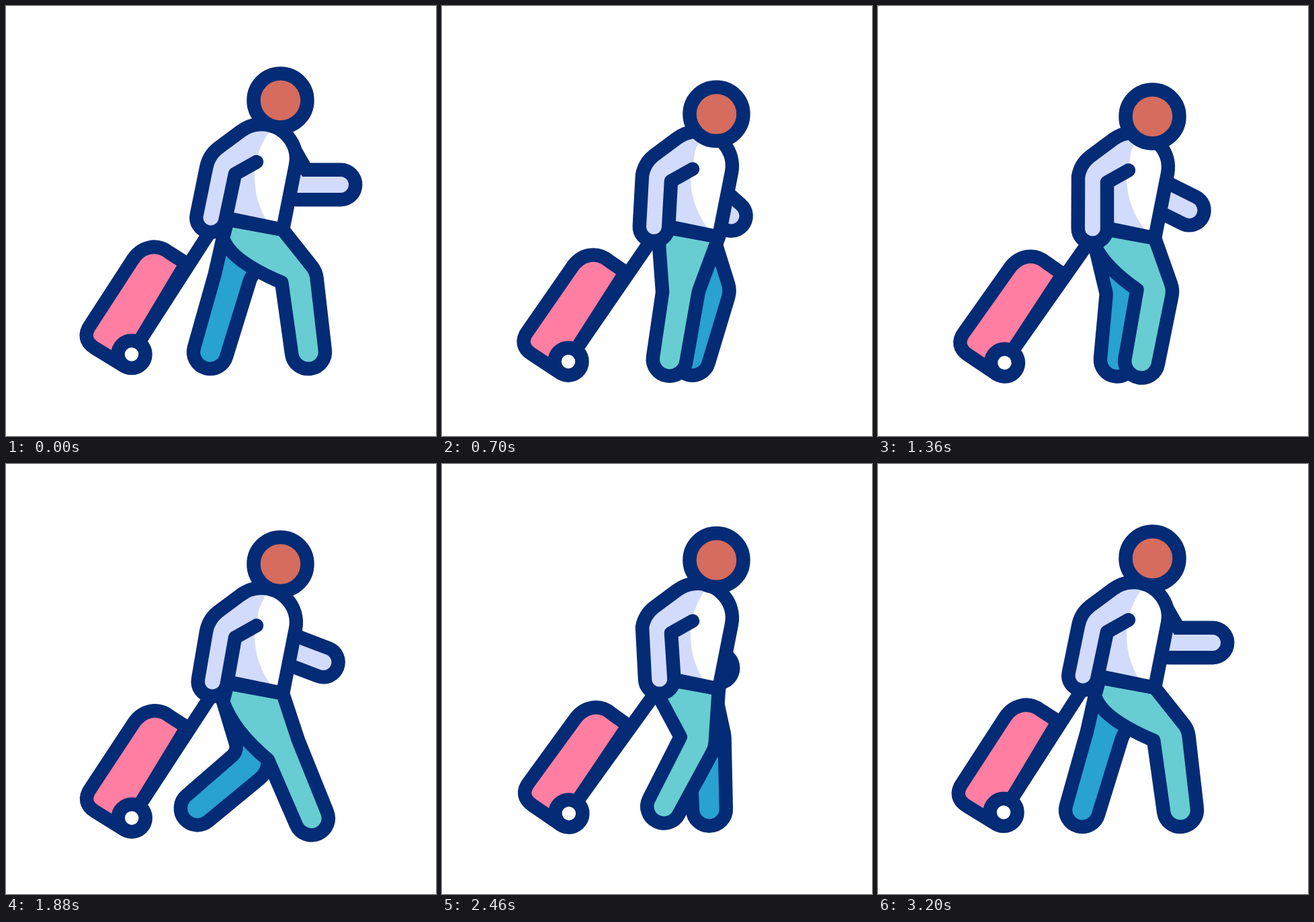
Recreate the animation shown at these times as an HTML page with a canvas. Size 640x640 px, loop 3600 ms.

```html
<!DOCTYPE html>
<html lang="en">
<head>
<meta charset="utf-8">
<title>Traveller with suitcase</title>
<style>
html, body { margin: 0; width: 100%; height: 100%; overflow: hidden; background: #fff; }
canvas { display: block; width: 100vw; height: 100vh; }
</style>
</head>
<body>
<canvas id="stage" width="640" height="640"></canvas>
<script>
const ctx = document.getElementById('stage').getContext('2d');
const NAVY = '#042b75', TEAL = '#67cdd2', BLUE = '#28a2cf', LILAC = '#d2dbfc',
      PINK = '#ff7ea1', SKIN = '#d56c5d', LINE = 20.5, LOOP = 3600;
const { sin, cos, abs, max, min, hypot, atan2, PI } = Math;

// Walking pace: time in ms against strides taken, two in all.
const pace = [[0, 0], [700, 0.375], [1360, 0.875], [1880, 1.125], [2460, 1.75], [3200, 2]];

// One stride of a leg in even steps: knee x, y and ankle x, y. Both legs share it.
const gait = [
  [435, 408, 450, 515], [413, 422, 455, 519], [393, 413, 398, 512], [353, 419, 339, 515],
  [335, 405, 304, 515], [355, 442, 273, 504], [377, 416, 330, 508], [410, 414, 392, 516]
];

function hermite(a, b, da, db, u) {
  const v = 1 - u;
  return v * v * (1 + 2 * u) * a + u * u * (3 - 2 * u) * b + u * v * (v * da - u * db);
}

// Smooth and always forward.
function strides(t) {
  const last = pace.length - 1;
  if (t >= pace[last][0]) return pace[last][1];
  const speed = k => (pace[k + 1][1] - pace[k][1]) / (pace[k + 1][0] - pace[k][0]);
  const tangent = k => k % last ? 2 / (1 / speed(k - 1) + 1 / speed(k)) : 0;
  const k = pace.findIndex(p => t < p[0]) - 1;
  const [t0, a] = pace[k], [t1, b] = pace[k + 1], h = t1 - t0;
  return hermite(a, b, h * tangent(k), h * tangent(k + 1), (t - t0) / h);
}

function step(phase) {
  const n = gait.length, x = (phase + 1) % 1 * n, i = Math.floor(x);
  const [p, a, b, q] = [-1, 0, 1, 2].map(d => gait[(i + d + n) % n]);
  return a.map((v, j) => hermite(v, b[j], (b[j] - p[j]) / 2, (q[j] - v) / 2, x - i));
}

// Far arm: 0 is fully forward, 1 fully back.
const armSwing = p => p < 0.75 ? 1 - (1 - p / 0.75) ** 2 : abs(cos(2 * PI * (p - 0.75))) ** 2.6;
// Two dips per stride, the second one late.
const dip = p => abs(sin(2 * PI * (p - 0.23 * sin(PI * p * p) ** 2))) ** 1.2;

function paint(path, fill, width = LINE) {
  if (fill) { ctx.fillStyle = fill; ctx.fill(path); }
  if (width) { ctx.lineWidth = width; ctx.strokeStyle = NAVY; ctx.stroke(path); }
}
function disc(x, y, r, fill) {
  const p = new Path2D();
  p.arc(x, y, r, 0, 7);
  paint(p, fill);
}
// Unit vector from a to b and its forward-facing normal.
function axes(ax, ay, bx, by) {
  const d = hypot(bx - ax, by - ay), dx = (bx - ax) / d, dy = (by - ay) / d;
  return { dx, dy, nx: dy, ny: -dx, turn: atan2(-dx, dy) };
}

function leg([kx, ky, fx, fy], fill, isNear) {
  const r = 25, { dx, dy, nx, ny, turn } = axes(kx, ky, fx, fy);
  const backX = kx - r * nx, backY = ky - r * ny, hipX = 323, hipY = 345;
  const p = new Path2D();
  p.moveTo(isNear ? 412 : 408, isNear ? 333 : 345);
  p.arcTo(kx + 28 * nx - 9 * dx, ky + 28 * ny - 9 * dy, fx + r * nx, fy + r * ny, 35);
  p.arc(fx, fy, r, turn, turn + PI);
  if (isNear) {
    const sag = max(0, backX - 365) * 0.75;
    p.lineTo(backX, backY);
    p.quadraticCurveTo((backX + hipX) / 2 - sag, (backY + hipY) / 2, hipX, hipY);
    p.lineTo(330, 318);
  } else {
    p.arcTo(backX, backY, hipX, hipY, 18);
    p.lineTo(hipX, hipY);
  }
  p.closePath();
  paint(p, fill);
}

function farArm(s) {
  const x = 434 - 64 * s, y = 266 - 5 * s, bend = PI / 4 * sin(s * PI / 2), len = 64 - 6 * s;
  const p = new Path2D();
  p.moveTo(396, 200);
  p.lineTo(x, y);
  p.lineTo(x + len * cos(bend), y + len * sin(bend));
  paint(p, null, 65);
  ctx.lineWidth = 24;
  ctx.strokeStyle = LILAC;
  ctx.stroke(p);
}

const caseBody = new Path2D('M268 383 L243 367 C224 352 200 358 187 380 L126 474 C115 489 119 501 132 509 L176 536 L201 495 Z');
const handle = new Path2D('M187 517 L301 340');
function suitcase(hand) {
  const sway = hand - 305;
  ctx.save();
  ctx.translate(187 + sway * 0.1, 518);
  ctx.rotate(sway * 0.165 * PI / 180);
  ctx.translate(-187, -518);
  paint(caseBody, PINK);
  paint(handle);
  disc(187, 518.5, 20.5, '#fff');
  ctx.restore();
}

const trunkLine = 'M330 316 L412 333 L431 237 C437 205 412 176 380 176';
const trunk = new Path2D(trunkLine), shirt = new Path2D(trunkLine + 'L341 250 Z');
const light = new Path2D('M405 172 C382 195 370 225 370 253 C370 285 380 312 400 336 L400 360 L450 360 L450 150 L405 150 Z');
function torso(dy) {
  paint(shirt, LILAC, 0);
  ctx.save();
  ctx.clip(shirt);
  ctx.translate(0, -dy);   // the lit edge stays put while the body bobs
  paint(light, '#fff', 0);
  ctx.restore();
  paint(trunk);
}

function nearArm(hand) {
  const y = 315 + min(3.5, (hand - 305) * 0.25), r = 21.7;
  const { nx, ny, turn } = axes(320, 245, hand, y);
  const p = new Path2D('M380 176 C365 176 356 182 350 186 L315 212 C305 220 300 230 298 241');
  p.lineTo(hand - r * nx, y - r * ny);
  p.arc(hand, y, r, turn + PI, turn, true);
  p.lineTo(341, 250);
  p.lineTo(373, 232);
  paint(p, LILAC);
}

function draw(t) {
  const p = strides(t) % 1;
  const hop = t < 560 ? sin(PI * t / 560) ** 2 : 0;   // springy first step
  const dy = 12.7 * dip(p) - 20 * hop;
  const nod = 11.5 * dip(p) * sin(2 * PI * (p - 0.125)) ** 2 - 3 * hop;
  const hand = 305 + 19 * max(0, sin(PI * p * p)) ** 0.7 + 10.5 * hop;
  const reach = [9, -8, 20, -14];
  const near = step(p).map((v, i) => v + reach[i] * hop);
  const far = step(p + 0.5 + 0.04 * sin(4 * PI * p));

  ctx.fillStyle = '#fff';
  ctx.fillRect(0, 0, 640, 640);
  ctx.lineCap = ctx.lineJoin = 'round';
  ctx.save();
  ctx.translate(0, dy);
  farArm(armSwing(p) * (1 - hop));
  leg(far, BLUE, false);
  suitcase(hand);
  leg(near, TEAL, true);
  torso(dy);
  nearArm(hand);
  disc(408.5, 140.5 + nod, 40, SKIN);
  ctx.restore();
}

const start = performance.now();
function tick() {
  draw((performance.now() - start) % LOOP);
  requestAnimationFrame(tick);
}
tick();
</script>
</body>
</html>
```
